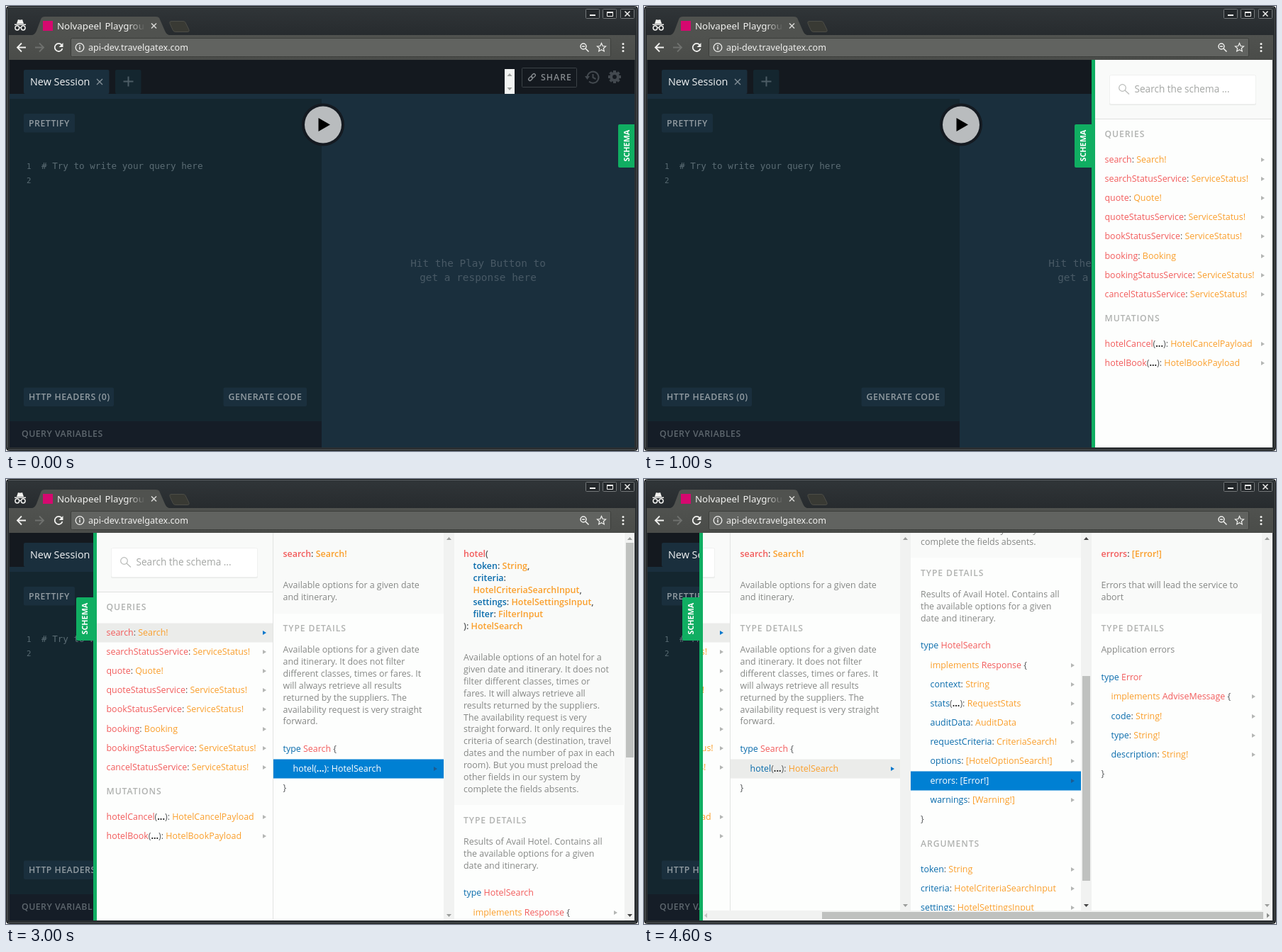
These frames come from a looping animation (891x628 px, 5000 ms). An HTML page:

```html
<!DOCTYPE html>
<html lang="en">
<head>
<meta charset="utf-8">
<title>Schema explorer</title>
<style>
  html, body { margin: 0; width: 100%; height: 100%; overflow: hidden; background: #fff; }
  svg { display: block; width: 891px; height: 628px; }
  text { font: 12.45px "Open Sans", sans-serif; white-space: pre; }
  .ui { font-family: "Noto Sans", sans-serif; }
  .mono { font-family: "DejaVu Sans Mono", monospace; }
  .label { font-size: 12.3px; font-weight: 600; letter-spacing: .48px; }
  .section { font-size: 12.2px; font-weight: 600; letter-spacing: .9px; fill: #b0b2b0; }
  .title { font-weight: 600; }
  .dots { font-weight: 700; }
</style>
</head>
<body>
<svg viewBox="0 0 891 628">
  <defs>
    <linearGradient id="fade" gradientUnits="userSpaceOnUse" x1="172" x2="196" y1="0" y2="0">
      <stop stop-color="#f2f2f0"/><stop offset="1" stop-color="#f2f2f0" stop-opacity="0"/>
    </linearGradient>
    <linearGradient id="bar" x2="0" y2="1">
      <stop stop-color="#303538"/><stop offset="1" stop-color="#272b2e"/>
    </linearGradient>
    <linearGradient id="tool" x2="0" y2="1">
      <stop stop-color="#50524f"/><stop offset="1" stop-color="#4a4c49"/>
    </linearGradient>
    <clipPath id="view"><rect x="5" y="76" width="881" height="547"/></clipPath>
    <clipPath id="panelClip"><rect id="panelBox" y="76" height="547" width="0"/></clipPath>
  </defs>
  <g id="window"></g>
  <g clip-path="url(#view)">
    <g id="page"></g>
    <g id="panel" clip-path="url(#panelClip)"></g>
    <g id="handle">
      <path d="M0 167h-22q-2 0-2 2v57q0 2 2 2h22z" fill="#10ae62"/>
      <text transform="translate(-8 219.5) rotate(-90)" fill="#fff" style="font-size:10.8px;font-weight:700">SCHEMA</text>
    </g>
  </g>
</svg>
<script>
const $ = id => document.getElementById(id);
const RED = '#f25c5c', ORANGE = '#fa9f2c', BLUE = '#0a6cac', INK = '#55585a', GREY = '#868886';
const PICK = '#0080d3', PALE = '#f9faf9', WHITE = '#fdfefd';

const rect = (x, y, w, h, fill, more = '') =>
  `<rect x="${x}" y="${y}" width="${w}" height="${h}" fill="${fill}" ${more}/>`;
const path = (d, stroke, width = 1, fill = 'none') =>
  `<path d="${d}" stroke="${stroke}" stroke-width="${width}" fill="${fill}"/>`;
const shape = (d, fill) => `<path d="${d}" fill="${fill}"/>`;
const circle = (x, y, r, fill, more = '') => `<circle cx="${x}" cy="${y}" r="${r}" fill="${fill}" ${more}/>`;
const text = (x, y, body, fill = INK, more = '') => `<text x="${x}" y="${y}" fill="${fill}" ${more}>${body}</text>`;
const span = (body, fill, cls = '') => `<tspan fill="${fill}" class="${cls}">${body}</tspan>`;
const cross = (x, y, r, color, width) =>
  path(`M${x - r} ${y - r}l${2 * r} ${2 * r}m0 ${-2 * r}l${-2 * r} ${2 * r}`, color, width);
const at = (x, y, body) => `<g transform="translate(${x} ${y})">${body}</g>`;
const arrow = (x, y, fill = '#b4b6b4') => shape(`M${x - 2} ${y - 3}l5 3l-5 3z`, fill);
const section = (x, y, body) => text(x, y, body, '#b0b2b0', 'class="section"');
const lines = (x, y, list) =>
  list.map((body, i) => text(x, Math.round(y + i * 16.9), body, GREY)).join('');

function drawWindow() {
  const light = '#f0f0ee';
  const button = x => rect(x + .5, 4.5, 19, 13, '#24282b', 'stroke="#74787a" rx="1"');
  return rect(.5, .5, 890, 627, '#2b2f32', 'rx="4" stroke="#141617"')
    + rect(2, 2, 887, 39, 'url(#bar)') + rect(3, 1, 885, 1, '#5a5f62')
    + rect(1, 4, 1, 619, '#5a5f62') + rect(889, 4, 1, 619, '#4a4e50') + rect(3, 626, 885, 1, '#54585a')
    + rect(4, 41, 883, 35, 'url(#tool)')
    + shape('M37 41Q41 40 43 35L49 19Q50 15 55 15H211Q216 15 217 19L224 35Q226 40 230 41z', '#50524f')
    + path('M233 21.5h17q2 0 3 2l5 10q1 3-2 3h-17q-3 0-4-3l-4-9q-1-3 2-3z', '#4c4d47', 1, '#393a34')
    + shape('M15 25l2-6q3 1 6 0l2 6zM12 25.500h16v1.500h-16z', light)
    + [15.8, 24.2].map(x => circle(x, 31, 2.900, 'none', `stroke="${light}" stroke-width="1.5"`)).join('')
    + path('M18.500 30.500h3', light, 1.3)
    + rect(52, 21, 14, 14, '#d6086f')
    + text(72, 33, 'Nolvapeel', 'url(#fade)', 'class="ui" style="font-size:13.3px"')
    + text(139.5, 33, 'Playgrou', 'url(#fade)', 'class="ui" style="font-size:13.3px"')
    + cross(208.5, 28, 3.500, '#d8d8d6', 1.5)
    + button(817) + button(841) + button(866)
    + path('M823 13h8', light, 2) + path('M847.500 8.500h8v6h-8z', light) + path('M847 9h9', light, 2)
    + cross(876, 11, 3.500, light, 1.5)
    + path('M28 58.500H16.500M22 52.500l-6 6l6 6', light, 1.8)
    + path('M41 58.500H52.500M47 52.500l6 6l-6 6', '#6f716e', 1.8)
    + path('M78.500 55A5.500 5.500 0 1 0 79.500 60', light, 1.8) + shape('M80.500 52v6h-6z', light)
    + rect(91.5, 45.5, 761, 26, '#616360', 'rx="2" stroke="#3c3e3b"')
    + circle(104, 58.5, 5.800, 'none', `stroke="${light}" stroke-width="1.3"`)
    + path('M104 57.500v4M104 55v1.500', light, 1.5)
    + text(116, 63, 'api-dev.travelgatex.com', light, 'class="ui" style="font-size:12.6px"')
    + circle(814, 57, 4, 'none', `stroke="${light}" stroke-width="1.5"`)
    + path('M817 60l4.500 4.500M812 57h4', light, 1.5)
    + path('M839.500 52.500l1.800 4l4.200.4l-3.200 2.800l1 4.200l-3.800-2.200l-3.800 2.200l1-4.200l-3.200-2.800l4.200-.4z', light, 1.2)
    + [53.5, 58.5, 63.5].map(y => circle(870, y, 1.500, light)).join('');
}

function gear(x, y, color) {
  const teeth = Array.from({ length: 8 }, (_, i) =>
    `<rect x="-2" y="-9" width="4" height="5" fill="${color}" transform="rotate(${i * 45})"/>`).join('');
  return at(x, y, teeth + circle(0, 0, 4.900, 'none', `stroke="${color}" stroke-width="4"`));
}

function drawPage() {
  const dark = '#14191f', slate = '#1a2f3d', deep = '#14262f', dim = '#43494f';
  const label = (x, y, body, fill) => text(x, y, body, fill, 'class="label"');
  const button = (x, y, w, body) => rect(x, y, w, 26.5, slate, 'rx="2"') + label(x + 7, y + 17.5, body, '#929ca2');
  const mono = (x, y, size, body, fill, more = '') =>
    text(x, y, body, fill, `class="mono" style="font-size:${size}px" ${more}`);
  return rect(5, 76, 881, 547, slate) + rect(5, 76, 881, 48, dark)
    + rect(25, 90, 120.5, 34, slate, 'rx="2"') + rect(154, 90, 36.5, 34, deep, 'rx="2"')
    + text(34, 112, 'New Session', '#f2f4f5', 'style="font-size:14.4px"')
    + cross(132, 107, 4, '#87939b', 1.3)
    + path('M165.500 106.500h14M172.500 99.500v14', '#4d5d66', 2)
    + rect(703, 89, 14, 35, '#f3f4f3')
    + shape('M706.500 99h7l-3.500-4zM706.500 115h7l-3.500 4z', '#a0a2a0')
    + rect(727.5, 87.5, 77, 27, 'none', 'rx="1" stroke="#3c4247"')
    + `<g transform="translate(741.5 100.500) rotate(-45)">`
    + rect(-6, -2, 6.5, 4, 'none', 'rx="2" stroke="#8a8f93" stroke-width="1.3"')
    + rect(-.5, -2, 6.5, 4, 'none', 'rx="2" stroke="#8a8f93" stroke-width="1.3"') + '</g>'
    + text(754, 104.5, 'SHARE', '#858a8e', 'class="label" style="letter-spacing:1px"')
    + path('M819.500 100A8 8 0 1 1 822 106.500M827.500 96v5l4 2', dim, 2)
    + shape('M816 99h7l-3.500 5z', dim) + gear(858, 100, dim)
    + rect(5, 131, 440, 455, deep) + rect(5, 586, 440, 37, '#151d27')
    + button(25, 152, 72, 'PRETTIFY') + button(25, 538.5, 127, 'HTTP HEADERS (0)')
    + button(306.5, 538.5, 117.5, 'GENERATE CODE')
    + label(22, 608, 'QUERY VARIABLES', '#5e676e')
    + mono(29, 230, 10.8, '1', '#586a72') + mono(29, 250, 10.8, '2', '#586a72')
    + mono(50, 230, 12.6, '# Try to write your query here', '#5b6c74')
    + mono(665.5, 368, 14.4, 'Hit the Play Button to', '#485965', 'text-anchor="middle"')
    + mono(665.5, 388, 14.4, 'get a response here', '#485965', 'text-anchor="middle"')
    + circle(447, 167.5, 30, '#141a21') + circle(447, 167.5, 26, '#b9bcbe')
    + shape('M440.500 158v19l16.500-9.500z', '#000');
}

// One "name(...): Type" line; mode is '', 'active' or 'open'.
function field(x, y, name, type, { color = BLUE, args = false, mode = '', width = 240, tip = 228 } = {}) {
  const paint = c => mode === 'active' ? '#fff' : c;
  const back = mode && rect(0, y - 17.500, width, 27, mode === 'active' ? PICK : '#ebecea');
  const tipColor = { active: '#1c5c92', open: '#0a78cc' }[mode];
  const dots = args ? span('(', paint(INK)) + span('...', paint('#222'), 'dots') + span(')', paint(INK)) : '';
  return back + text(x, y, span(name, paint(color)) + dots + span(': ', paint(INK)) + span(type, paint(ORANGE)))
    + arrow(tip, y - 4, tipColor);
}

const typeLine = (x, y, name, tail = '') =>
  text(x, y, span('type ', BLUE) + span(name, RED) + span(tail, INK));
const implementsLine = (y, name) =>
  text(27.5, y, span('implements ', ORANGE) + span(name, RED) + ' {') + arrow(228, y - 4);
const heading = (x, y, parts) =>
  text(x, y, parts.map(([body, fill]) => span(body, fill)).join(''), INK, 'class="title"');

function rootColumn(mode) {
  const queries = [['search', 'Search!'], ['searchStatusService', 'ServiceStatus!'], ['quote', 'Quote!'],
    ['quoteStatusService', 'ServiceStatus!'], ['bookStatusService', 'ServiceStatus!'], ['booking', 'Booking'],
    ['bookingStatusService', 'ServiceStatus!'], ['cancelStatusService', 'ServiceStatus!']];
  const base = { color: RED, width: 249, tip: 236 };
  return rect(0, 76, 255, 547, WHITE) + rect(0, 76, 255, 83, PALE) + rect(0, 159, 255, 1, '#dfe1df')
    + rect(20, 98, 207, 42, '#e9ebe9', 'rx="2"') + rect(20.5, 97.5, 206, 41, '#fff', 'rx="2" stroke="#f0f1f0"')
    + circle(38.5, 115.5, 4.800, 'none', 'stroke="#b9bbb9" stroke-width="1.2"') + path('M42 119l6 5.500', '#b9bbb9', 1.2)
    + text(55.5, 122, 'Search the schema ...', '#a4a6a4', 'style="font-size:13.6px"')
    + section(13.5, 185, 'QUERIES')
    + queries.map(([name, type], i) =>
        field(13.5, Math.round(221 + i * 27.1), name, type, { ...base, mode: i ? '' : mode })).join('')
    + section(13.5, 445, 'MUTATIONS')
    + field(13.5, 481, 'hotelCancel', 'HotelCancelPayload', { ...base, args: true })
    + field(13.5, 508, 'hotelBook', 'HotelBookPayload', { ...base, args: true });
}

function searchColumn(mode) {
  const intro = 'Available options for a given date';
  return rect(-1, 76, 256, 547, WHITE) + rect(0, 76, 240, 114, PALE) + rect(-1, 76, 1, 547, '#e2e4e2')
    + heading(13.5, 110, [['search', RED], [': ', INK], ['Search!', ORANGE]])
    + lines(13.5, 154, [intro, 'and itinerary.'])
    + section(13.5, 215, 'TYPE DETAILS')
    + lines(13.5, 245, [intro, 'and itinerary. It does not filter', 'different classes, times or fares. It',
      'will always retrieve all results', 'returned by the suppliers. The', 'availability request is very straight', 'forward.'])
    + typeLine(13.5, 385, 'Search', ' {')
    + field(27.5, 413, 'hotel', 'HotelSearch', { args: true, mode })
    + text(13.5, 440, '}');
}

function hotelColumn(scroll, mode) {
  const fields = [['context', 'String'], ['stats', 'RequestStats', true], ['auditData', 'AuditData'],
    ['requestCriteria', 'CriteriaSearch!'], ['options', '[HotelOptionSearch!]'], ['errors', '[Error!]'], ['warnings', '[Warning!]']];
  const params = [['token', 'String'], ['criteria', 'HotelCriteriaSearchInput'], ['settings', 'HotelSettingsInput']];
  const head = [
    [14, [['hotel', RED], ['(', INK]]],
    [27.5, [['token', BLUE], [': ', INK], ['String', ORANGE], [',', INK]]],
    [27.5, [['criteria', BLUE], [':', INK]]],
    [27.5, [['HotelCriteriaSearchInput', ORANGE], [',', INK]]],
    [27.5, [['settings', BLUE], [': ', INK], ['HotelSettingsInput', ORANGE], [',', INK]]],
    [27.5, [['filter', BLUE], [': ', INK], ['FilterInput', ORANGE]]],
    [14, [['): ', INK], ['HotelSearch', ORANGE]]]];
  return rect(0, 76, 255, 547, WHITE) + at(0, -scroll,
    rect(0, 76, 240, 384, PALE)
    + head.map(([x, parts], i) => heading(x, 110 + i * 17, parts)).join('')
    + lines(14, 256, ['Available options of an hotel for a', 'given date and itinerary. It does not',
      'filter different classes, times or', 'fares. It will always retrieve all', 'results returned by the suppliers.',
      'The availability request is very', 'straight forward. It only requires the', 'criteria of search (destination, travel',
      'dates and the number of pax in each', 'room). But you must preload the', 'other fields in our system by', 'complete the fields absents.'])
    + section(14, 486, 'TYPE DETAILS')
    + lines(14, 516, ['Results of Avail Hotel. Contains all', 'the available options for a given', 'date and itinerary.'])
    + typeLine(14, 588, 'HotelSearch') + implementsLine(616, 'Response')
    + fields.map(([name, type, args], i) =>
        field(27.5, Math.round(643 + i * 27.1), name, type, { args, mode: name === 'errors' ? mode : '' })).join('')
    + text(14, 833, '}') + section(14, 868, 'ARGUMENTS')
    + params.map(([name, type], i) => field(14, Math.round(903.5 + i * 27.1), name, type)).join(''));
}

function errorsColumn() {
  const fields = [['code', 'String!'], ['type', 'String!'], ['description', 'String!']];
  return rect(0, 76, 255, 547, WHITE) + rect(0, 76, 240, 114, PALE)
    + heading(13.5, 110, [['errors', RED], [': ', INK], ['[Error!]', ORANGE]])
    + lines(13.5, 154, ['Errors that will lead the service to', 'abort'])
    + section(13.5, 215, 'TYPE DETAILS') + lines(13.5, 245, ['Application errors'])
    + typeLine(13.5, 284, 'Error') + implementsLine(311, 'AdviseMessage')
    + fields.map(([name, type], i) => field(27.5, Math.round(338.5 + i * 27), name, type)).join('')
    + text(13.5, 420, '}');
}

function scrollbar(x, bottom, thumb, up = '#9b9d9b', down = up) {
  return rect(x, 76, 15, bottom - 76, '#f1f2f1')
    + (thumb ? rect(x + 2, thumb[0], 11, thumb[1] - thumb[0], '#bfc1bf') : '')
    + shape(`M${x + 4} 86h7l-3.500-4z`, up) + shape(`M${x + 4} ${bottom - 9}h7l-3.500 4z`, down);
}

function bottomBar() {
  return rect(83, 609, 803, 14, '#f1f2f1') + rect(251, 611, 622, 10, '#bfc1bf')
    + shape('M89 612.500v7l-4-3.500z', '#c2c4c2') + shape('M878 612.500v7l4-3.500z', '#8a8c8a');
}

const edges = [887, 631, 377, 123, 78];
const scenes = [
  () => '',
  () => at(636, 0, rootColumn('')),
  () => at(382, 0, rootColumn('active')) + at(631, 0, searchColumn('')) + scrollbar(871, 623),
  () => at(128, 0, rootColumn('open')) + at(377, 0, searchColumn('active')) + at(631, 0, hotelColumn(0, ''))
    + scrollbar(617, 623) + scrollbar(872, 623, [90, 393], '#9b9d9b', '#444'),
  () => at(-127, 0, rootColumn('open')) + at(122, 0, searchColumn('open')) + at(376, 0, hotelColumn(349, 'active'))
    + at(631, 0, errorsColumn()) + scrollbar(361, 609) + scrollbar(616, 609, [278, 567], '#444')
    + scrollbar(871, 609) + bottomBar()
];

let shown = -1;
function render(time) {
  const step = Math.floor(time / 1000) % scenes.length;
  if (step !== shown) {
    shown = step;
    const edge = edges[step];
    $('panelBox').setAttribute('x', edge);
    $('panelBox').setAttribute('width', Math.max(0, 886 - edge));
    $('panel').innerHTML = scenes[step]() + rect(edge, 76, 5, 547, '#10ae62');
    $('handle').setAttribute('transform', `translate(${edge} 0)`);
  }
}

$('window').innerHTML = drawWindow();
$('page').innerHTML = drawPage();
const start = performance.now();
function tick() {
  render(performance.now() - start);
  requestAnimationFrame(tick);
}
tick();
</script>
</body>
</html>
```
